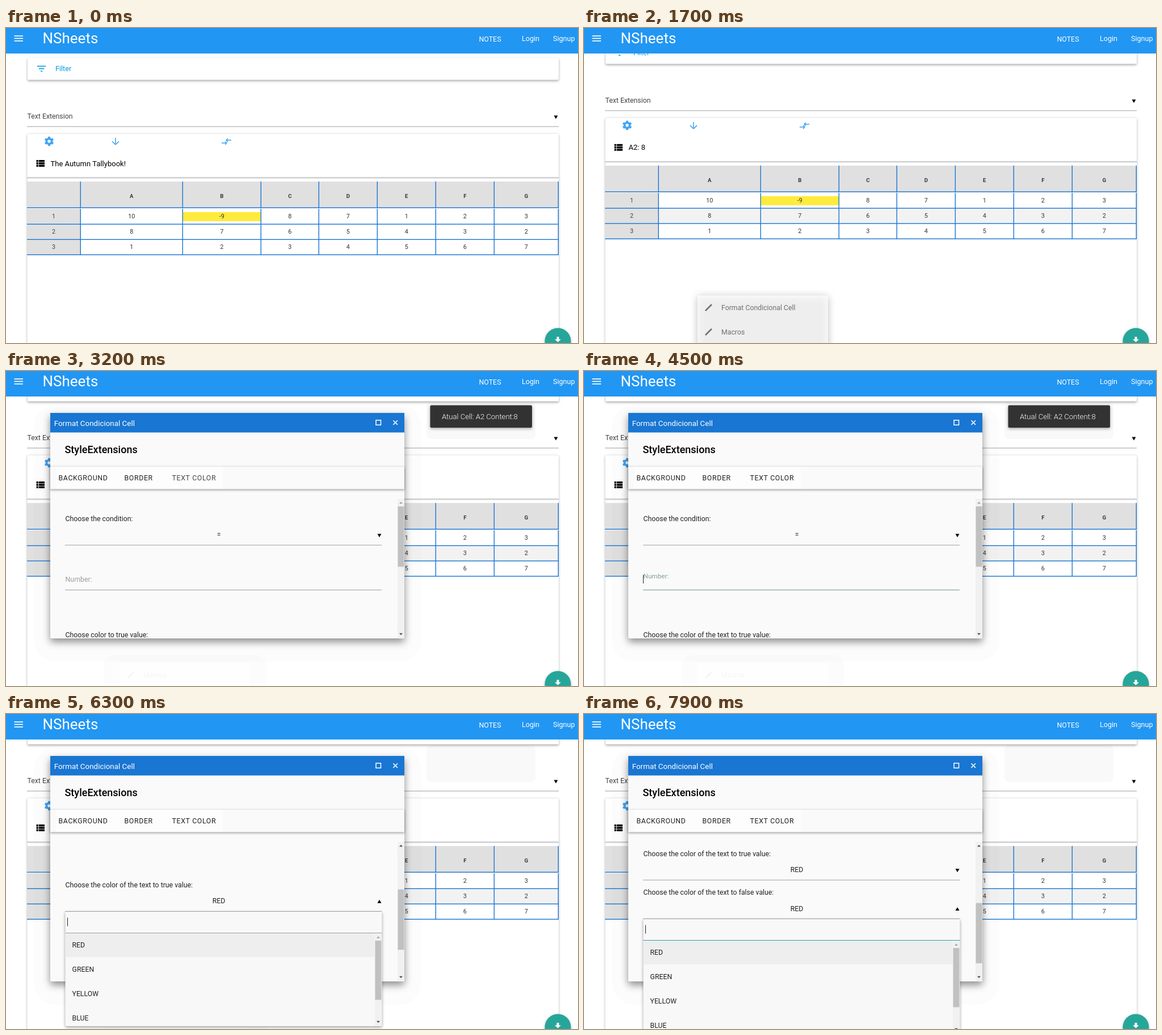
These frames come from a looping animation (1008 by 556 pixels, 8000 ms). An HTML page with a canvas:

```html
<!DOCTYPE html>
<html lang="en">
<head>
<meta charset="utf-8">
<title>Spreadsheet conditional format</title>
<style>
html, body { margin: 0; width: 100%; height: 100%; overflow: hidden; background: #fff; }
canvas { display: block; width: 1008px; height: 556px; }
</style>
</head>
<body>
<canvas id="stage" width="1008" height="556"></canvas>
<script>
const ctx = document.getElementById('stage').getContext('2d');
const LOOP = 8000, STEP = 100;
const BLUE = '#2196f3', ICON = '#42a5f5', DEEP = '#1976d2', TEAL = '#26a69a', GREY = '#9e9e9e', INK = '#212121';
const BODY = 12.3, ROW = 27;
const COLORS = ['RED', 'GREEN', 'YELLOW', 'BLUE'];

// Eased 0..1; the first step is already visible at a, the last one at b.
function ramp(t, a, b) {
  const p = Math.min(1, Math.max(0, (t - a + STEP) / (b - a + STEP)));
  return p * p * (3 - 2 * p);
}

const blink = (t, since) => t >= since && Math.floor((t - since) / 500) % 2 === 0;

function mix(a, b, f) {
  const part = (c, i) => parseInt(c.slice(i, i + 2), 16);
  return '#' + [1, 3, 5].map(i =>
    Math.round(part(a, i) + (part(b, i) - part(a, i)) * f).toString(16).padStart(2, '0')).join('');
}

function rect(x, y, w, h, color) {
  ctx.fillStyle = color;
  ctx.fillRect(x, y, w, h);
}

function round(x, y, w, h, radius, color) {
  ctx.fillStyle = color;
  ctx.beginPath();
  ctx.roundRect(x, y, w, h, radius);
  ctx.fill();
}

function withShadow(blur, dy, shade, paint) {
  ctx.save();
  ctx.shadowColor = `rgba(0,0,0,${shade})`;
  ctx.shadowBlur = blur;
  ctx.shadowOffsetY = dy;
  paint();
  ctx.restore();
}

function card(x, y, w, h, color, blur = 4, dy = 2, shade = 0.35) {
  withShadow(blur, dy, shade, () => round(x, y, w, h, 2, color));
}

// y is the middle of the capitals.
function text(str, x, y, size = BODY, color = INK, opt = {}) {
  ctx.font = `${opt.weight || 400} ${size}px Roboto, sans-serif`;
  ctx.letterSpacing = (opt.spacing || 0) + 'px';
  ctx.textAlign = opt.align || 'left';
  ctx.fillStyle = color;
  ctx.fillText(str, x, y + size * 0.356);
}

function line(color, width, x1, y1, x2, y2) {
  ctx.strokeStyle = color;
  ctx.lineWidth = width;
  ctx.beginPath();
  ctx.moveTo(x1, y1);
  ctx.lineTo(x2, y2);
  ctx.stroke();
}

// Open arrow with its tip at x, y, pointing along angle.
function arrow(x, y, length, head, angle) {
  ctx.save();
  ctx.translate(x, y);
  ctx.rotate(angle);
  line(ICON, 1.6, -length, 0, 0, 0);
  for (const side of [-head, head]) line(ICON, 1.6, -head, side, 0, 0);
  ctx.restore();
}

function triangle(x, y, w, h, color = '#000', up = false) {
  const d = up ? -h / 2 : h / 2;
  ctx.fillStyle = color;
  ctx.beginPath();
  ctx.moveTo(x - w / 2, y - d);
  ctx.lineTo(x + w / 2, y - d);
  ctx.lineTo(x, y + d);
  ctx.fill();
}

function scrollbar(x, top, bottom, thumb, length, atTop) {
  rect(x, top, 12, bottom - top, '#f1f1f1');
  rect(x + 0.5, thumb, 11, length, '#c1c1c1');
  triangle(x + 6, top + 7, 6, 3.5, atTop ? '#a3a3a3' : '#505050', true);
  triangle(x + 6, bottom - 7, 6, 3.5, '#505050');
}

function gear(x, y) {
  ctx.save();
  ctx.translate(x, y);
  ctx.strokeStyle = ICON;
  ctx.lineWidth = 3.6;
  ctx.beginPath();
  ctx.arc(0, 0, 4.6, 0, 7);
  ctx.stroke();
  for (let i = 0; i < 6; i++) {
    rect(-2, -8.2, 4, 3.2, ICON);
    ctx.rotate(Math.PI / 3);
  }
  ctx.restore();
}

const columnX = c => c < 3 ? 131 + c * 180 - (c === 2 ? 42 : 0) : 551 + (c - 3) * 103 + (c === 7 ? 10 : 0);

function cellValue(r, c) {
  if (r === 1) return 8 - c;
  if (r === 2) return c + 1;
  return c === 1 ? -9 : c < 4 ? 10 - c : c - 3;
}

function table(t) {
  const top = 319, center = { align: 'center' };
  rect(37, 271, 937, 47, '#e0e0e0');
  rect(37, top, 94, 3 * ROW, '#e0e0e0');
  const selected = ramp(t, 500, 700) - ramp(t, 1600, 1700);
  if (t >= 200) rect(131, top + ROW, 843, ROW, mix('#f2f2f2', '#c2e2fb', selected));
  if (t >= 500 && t < 700) rect(131, top + 2 * ROW, 843, ROW, '#f2f2f2');
  rect(312, 325, 137, 16, '#ffeb3b');
  rect(37, 316.6, 937, 1.4, DEEP);
  for (let r = 0; r < 3; r++) {
    rect(37, top + (r + 1) * ROW - 0.4, 937, 1.4, DEEP);
    text(r + 1, 84, 332.5 + r * ROW, 10.8, '#424242', center);
  }
  for (let c = 0; c < 8; c++) {
    const x = columnX(c);
    rect(x - 0.4, 271, 1.4, 47, DEEP);
    rect(x - 0.4, top, 1.4, 3 * ROW + 1, DEEP);
    if (c === 7) break;
    const mid = (x + columnX(c + 1)) / 2 + 0.3;
    text('ABCDEFG'[c], mid, 296.5, 9.6, '#333', { align: 'center', weight: 700 });
    for (let r = 0; r < 3; r++) text(cellValue(r, c), mid, 332.5 + r * ROW, 10.8, '#333', center);
  }
}

function page(t) {
  ctx.save();
  ctx.translate(0, -38 * ramp(t, 1600, 1800));
  card(38, 52.5, 936, 39, '#fff');
  for (let i = 0; i < 3; i++) line('#039be5', 1.7, 55 + i * 3, 67.5 + i * 4.3, 70 - i * 2.8, 67.5 + i * 4.3);
  text('Filter', 87, 72, 12.6, '#039be5');
  text('Text Extension', 37.5, 156, BODY, '#424242');
  triangle(969, 157.5, 7, 6);
  rect(37, 173.5, 937, 1, GREY);

  card(37.5, 187, 936.5, 440, '#fff', 4, 1, 0.3);
  gear(76, 200);
  arrow(193, 206, 12, 6, Math.PI / 2);
  arrow(389, 203, 9, 3, 0);
  arrow(388, 198, 9, 3, Math.PI);
  for (let i = 0; i < 3; i++) {
    rect(53.5, 233 + i * 4.25, 3.4, 3.4, '#000');
    rect(57.8, 233 + i * 4.25, 10.2, 3.4, '#000');
  }
  text(t < 1100 ? 'The Autumn Tallybook!' : 'A2: 8', 78.5, 239, 13, '#000');
  rect(37, 263, 937, 2.5, '#cfcfcf');
  table(t);
  ctx.restore();
}

function chrome() {
  rect(0, 0, 1008, 45, BLUE);
  for (let i = 0; i < 3; i++) line('#fff', 1.7, 14.5, 14 + i * 4.4, 30, 14 + i * 4.4);
  text('NSheets', 64.5, 18, 26, '#fff');
  text('NOTES', 833.5, 19.5, 12.4, '#fff');
  text('Login', 909, 19, 12.6, '#fff');
  text('Signup', 964, 19, 12.6, '#fff');
  withShadow(5, 2, 0.3, () => round(949.5, 529.5, 46, 46, 23, TEAL));
  rect(970.5, 545, 4, 5, '#fff');
  triangle(972.5, 552, 11, 5, '#fff');
}

function menuItem(label, y, color) {
  line(color, 2.5, 214, y + 5, 225, y - 6);
  text(label, 242, y, BODY, color);
}

function menu(t) {
  ctx.globalAlpha = ramp(t, 1600, 1800);
  card(200, 472, 230, 100, '#fff', 14, 2);
  menuItem('Format Condicional Cell', 494, '#424242');
  menuItem('Macros', 537, '#424242');
  ctx.globalAlpha = 1;
}

function halos(t) {
  round(49, 60, 683, 453, 38, 'rgba(0,0,0,.012)');
  round(172, 502, 286, 80, 18, 'rgba(0,0,0,.012)');
  rect(200, 515, 230, 41, '#fefefe');
  menuItem('Macros', 537, '#f5f5f5');
  if (t >= 2400) round(741, 55, 192, 65, 8, 'rgba(0,0,0,.025)');
}

function toast(t) {
  const enter = ramp(t, 2200, 2400), leave = ramp(t, 6100, 6300);
  if (leave === 1) return;
  const y = 60.5 + 16 * (1 - enter) - 39 * leave;
  ctx.globalAlpha = enter ** 0.4 * (1 - leave);
  card(747.5, y, 179.5, 39.5, '#323232', 5, 2);
  text('Atual Cell: A2 Content:8', 768, y + 20, 13.1, '#fff', { weight: 300 });
  ctx.globalAlpha = 1;
}

function select(label, value, y, open) {
  text(label, 104.5, y);
  text(value, 375, y + 28.3, BODY, INK, { align: 'center' });
  triangle(658, y + (open ? 29 : 30), 7, 6, '#000', open);
  rect(104, y + 46.3, 558, 1, GREY);
}

function numberField(t) {
  const f = ramp(t, 4500, 4700), typed = t >= 5100;
  const color = mix(GREY, TEAL, f);
  text('Number:', 104.5, 368 - 23 * f, 12.4 - 2.5 * f, color);
  rect(104, 386 - 0.4 * f, 558, 1 + 0.6 * f, color);
  if (typed) text('8', 104.5, 367.5);
  if (blink(t, typed ? 5100 : 4500)) rect(typed ? 112 : 104, 360, 1, 15, '#222');
}

function dialogFrame(t) {
  card(78, 74, 624, 398, '#fafafa', 14, 6, 0.45);
  rect(78, 74, 624, 34.5, DEEP);
  text('Format Condicional Cell', 84.7, 92, 13.4, '#fff');
  ctx.strokeStyle = '#fff';
  ctx.lineWidth = 1.5;
  ctx.strokeRect(652, 86.8, 8.5, 8.5);
  for (const d of [-3.8, 3.8]) line('#fff', 1.5, 686.2 - d, 87.3, 686.2 + d, 94.9);
  text('StyleExtensions', 103.5, 139, 18, '#000', { weight: 500 });

  withShadow(4, 1.5, 0.4, () => rect(78, 168.5, 624, 40, '#fafafa'));
  rect(78, 168, 624, 1, '#e6e6e6');
  rect(88, 169, 293.5, 39, '#fdfdfd');
  const tab = { spacing: 0.6 };
  text('BACKGROUND', 92.5, 188.5, 12.4, INK, tab);
  text('BORDER', 208.5, 188.5, 12.4, INK, tab);
  ctx.globalAlpha = 1 - 0.3 * Math.sin(Math.PI * ramp(t, 3100, 3700));
  text('TEXT COLOR', 292.5, 188.5, 12.4, INK, tab);
  ctx.globalAlpha = 1;
}

function dialogForm(t) {
  const scroll = 81.5 * ramp(t, 5400, 5600) + 82 * ramp(t, 5700, 5900) + 55.5 * ramp(t, 7400, 7600);
  ctx.save();
  ctx.beginPath();
  ctx.rect(78, 225.5, 624, 246);
  ctx.clip();
  ctx.save();
  ctx.translate(0, -scroll);
  select('Choose the condition:', '=', 260.5, false);
  numberField(t);
  const subject = t >= 3400 ? 'the color of the text' : 'color';
  select(`Choose ${subject} to true value:`, 'RED', 465.3, t >= 6200 && t < 7200);
  select('Choose the color of the text to false value:', 'RED', 534, t >= 7800);
  ctx.restore();
  scrollbar(690, 225.5, 471.5, 239 + scroll * 0.432, 106.5, scroll === 0);
  ctx.restore();
}

function dropdown(t, top, open, close, focus) {
  if (t < open || t >= close) return;
  ctx.save();
  ctx.globalAlpha = ramp(t, open, open + STEP);
  ctx.translate(0, top);
  card(104.5, 0.5, 558, 202.5, '#f8f8f8', 5, 2, 0.4);
  rect(104, 0, 558, 1, GREY);
  rect(104.5, 39, 545, 42, '#eee');
  rect(104.5, 38, 558, 1, mix(GREY, TEAL, ramp(t, focus, focus + STEP)));
  COLORS.forEach((name, i) => text(name, 116.5, 59.2 + i * 43));
  scrollbar(650, 39, 202.5, 52, 104.5, true);
  if (blink(t, open + STEP)) rect(108, 11.5, 1, 15, '#222');
  ctx.restore();
}

function draw(t) {
  const opened = t >= 2200;
  rect(0, 0, 1008, 556, '#fff');
  page(t);
  if (opened) halos(t);
  else menu(t);
  chrome();
  if (!opened) return;
  dialogFrame(t);
  dialogForm(t);
  toast(t);
  dropdown(t, 348, 6200, 7200, 6400);
  dropdown(t, 361, 7800, LOOP, 7800);
}

const start = performance.now();
function tick() {
  const t = (performance.now() - start) % LOOP;
  draw(Math.floor(t / STEP) * STEP);
  requestAnimationFrame(tick);
}
tick();
</script>
</body>
</html>
```
